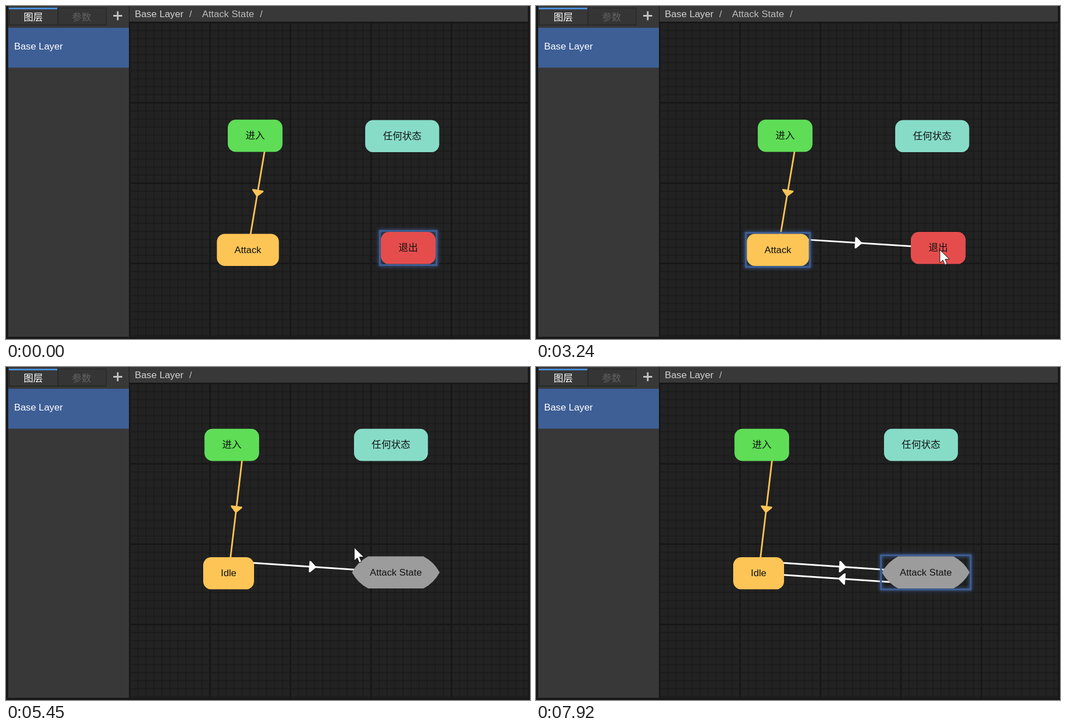
An HTML page with a canvas for the animation above (9050 ms loop, 938x597 px).

```html
<!DOCTYPE html>
<html lang="zh">
<head>
<meta charset="utf-8">
<style>
html, body { margin: 0; width: 100%; height: 100%; overflow: hidden; background: #191919; }
canvas { display: block; }
</style>
</head>
<body>
<canvas id="stage" width="938" height="597"></canvas>
<script>
const ctx = document.getElementById('stage').getContext('2d');
const LOOP = 9050, TICK = 70, UNIT = 14.4;
const FONT = '17.28px "Liberation Sans", Arial, "Noto Sans CJK SC", "Noto Sans CJK", sans-serif';
const GREEN = '#5fdd57', TEAL = '#87dcc8', ORANGE = '#fdc556', RED = '#e54d4d', GREY = '#9c9c9c';

const node = (text, x, y, w, color, lens) => ({ text, x, y, w, h: 57.6, color, lens });
const inner = {
  enter: node('进入', 397, 203.8, 98, GREEN),
  any: node('任何状态', 643, 204.5, 132.5, TEAL),
  attack: node('Attack', 377.5, 408.4, 111, ORANGE),
  exit: node('退出', 671, 405, 98, RED)
};
const outer = {
  enter: node('进入', 355.3, 110.8, 97.8, GREEN),
  any: node('任何状态', 623, 110.8, 132.3, TEAL),
  idle: node('Idle', 353, 341, 91, ORANGE),
  state: node('Attack State', 619.3, 339.4, 157, GREY, true)
};

// Pointer keys: time, x, y, easing towards the next key
const smooth = p => p * p * (3 - 2 * p);
const out = p => 1 - (1 - p) ** 2.4;
const path = [
  [600, 894, 430, out], [1160, 458.5, 433.5], [1960, 458.5, 433.5, smooth],
  [2230, 494, 450], [2370, 494, 450, smooth], [2720, 728, 439.5], [3239, 728, 439.5],
  [3240, 723, 437, smooth], [4090, 422, 19, smooth], [4500, 275, 17], [4900, 275, 17, smooth],
  [5520, 668, 363], [6190, 668, 363, smooth], [6330, 709, 388], [6600, 709, 388, smooth],
  [7090, 431.5, 361.5], [7580, 431.5, 361.5, smooth], [7850, 892, 530], [7920, 892, 530]
];
const clicks = [[1420, 1690], [1890, 2030], [2230, 2440], [2920, 3240], [4700, 4900],
  [5720, 5920], [6120, 6260], [6530, 6670], [7370, 7580]];
const within = (t, a, b) => t >= a && t < b;

function pointer(t) {
  if (!within(t, 600, 7920)) return null;
  const i = path.findIndex((k, n) => t < path[n + 1][0]);
  const [t0, x0, y0, ease = p => p] = path[i], [t1, x1, y1] = path[i + 1];
  const p = ease(Math.floor((t - t0) / TICK) * TICK / (t1 - t0));
  return { x: x0 + (x1 - x0) * p, y: y0 + (y1 - y0) * p };
}

function box(x, y, w, h, color) {
  ctx.fillStyle = color;
  ctx.fillRect(x, y, w, h);
}

function label(text, x, y, color, align = 'left') {
  ctx.font = FONT;
  ctx.textAlign = align;
  ctx.fillStyle = color;
  ctx.fillText(text, x, y);
}

function shape(points, color) {
  ctx.beginPath();
  points.forEach(([x, y]) => ctx.lineTo(x, y));
  ctx.closePath();
  ctx.fillStyle = color;
  ctx.fill();
}

function drawGrid() {
  box(221, 29, 713, 564, '#222222');
  ctx.save();
  ctx.beginPath();
  ctx.rect(221, 29, 713, 564);
  ctx.clip();
  for (let i = 0; i < 50; i++) {
    const major = i % 10 === 0, w = major ? 3 : 1.4, color = major ? '#171717' : '#1b1b1b';
    box(221.3 + i * UNIT - w / 2, 29, w, 564, color);
    box(221, 29.6 + i * UNIT - w / 2, 713, w, color);
  }
  ctx.restore();
}

function drawPanel() {
  box(4, 0, 216, 593, '#383838');
  box(221, 0, 713, 28, '#383838');
  box(5, 3, 175, 32, '#242424');
  box(6.5, 4, 85.5, 29.5, '#383838');
  box(93.5, 4, 85.5, 29.5, '#353535');
  box(5, 3, 87, 3, '#4b8fd8');
  label('图层', 31.5, 26, '#ffffff');
  label('参数', 118, 26, '#626262');
  box(192, 16, 16, 3, '#c4c4c4');
  box(198.5, 9.5, 3, 16, '#c4c4c4');
  box(4, 39, 216, 71.5, '#3e5f96');
  label('Base Layer', 14.4, 78, '#ffffff');
}

function drawCrumbs(t, deep) {
  label('Base Layer', 230.5, 19.5, within(t, 4290, 5000) ? '#ffffff' : '#d2d2d2');
  label('/', 328, 19.5, '#bcbcbc');
  if (!deep) return;
  label('Attack State', 351, 19.5, within(t, 4090, 4220) ? '#ffffff' : '#bcbcbc');
  label('/', 454.5, 19.5, '#bcbcbc');
}

function center(n) {
  return { x: n.x + n.w / 2, y: n.y + n.h / 2 };
}

// Links start beside the first centre and end at the second
function drawLink(from, to, color) {
  const c = center(from);
  const end = to.w ? center(to) : to;
  const vertical = Math.abs(end.y - c.y) > Math.abs(end.x - c.x);
  const start = vertical ? { x: c.x + 21.6, y: c.y }
    : { x: c.x, y: c.y + (end.x > c.x ? -21.6 : 21.6) };
  ctx.strokeStyle = color;
  ctx.lineWidth = 2.9;
  ctx.beginPath();
  ctx.moveTo(start.x, start.y);
  ctx.lineTo(end.x, end.y);
  ctx.stroke();
  ctx.save();
  ctx.translate((start.x + end.x) / 2, (start.y + end.y) / 2);
  ctx.rotate(Math.atan2(end.y - start.y, end.x - start.x));
  shape([[-5.5, -10], [-3, -10], [6.5, -1], [6.5, 1], [-3, 10], [-5.5, 10]], color);
  ctx.restore();
}

function drawNode(n, selected) {
  const { x, y, w, h } = n, c = center(n);
  if (selected) {
    ctx.save();
    ctx.strokeStyle = '#3e5f96';
    ctx.lineWidth = 3;
    ctx.shadowColor = '#4a76c0';
    ctx.shadowBlur = 6;
    ctx.strokeRect(x - 1.8, y - 1.8, w + 3.6, h + 3.6);
    ctx.restore();
  }
  ctx.fillStyle = n.color;
  ctx.beginPath();
  if (n.lens) {
    ctx.moveTo(x + 29, y);
    ctx.lineTo(x + w - 29, y);
    ctx.quadraticCurveTo(x + w - 10, y + 10, x + w, c.y);
    ctx.quadraticCurveTo(x + w - 10, y + h - 10, x + w - 29, y + h);
    ctx.lineTo(x + 29, y + h);
    ctx.quadraticCurveTo(x + 10, y + h - 10, x, c.y);
    ctx.quadraticCurveTo(x + 10, y + 10, x + 29, y);
  } else {
    ctx.roundRect(x, y, w, h, UNIT);
  }
  ctx.fill();
  label(n.text, c.x, c.y + 5.4, '#111111', 'center');
}

function drawMenu(x, y, hover, canDefault) {
  ctx.save();
  ctx.shadowColor = 'rgba(0,0,0,.5)';
  ctx.shadowBlur = 4;
  box(x, y, 168, 149.5, '#cccccc');
  ctx.restore();
  box(x + 1, y + 1, 166, 147.5, '#ffffff');
  if (hover) box(x + 1, y + 5.5, 166, 34.5, '#e6e6e6');
  ['连线', '设置为默认', '打开', '删除'].forEach((text, i) => {
    label(text, x + 35.5, y + 30.5 + i * 34.5, i === 1 && !canDefault ? '#6d6d6d' : '#1a1a1a');
  });
}

function drawPointer(p, pressed) {
  if (pressed) {
    ctx.fillStyle = 'rgba(255,250,0,.53)';
    ctx.beginPath();
    ctx.arc(p.x, p.y, 17.5, 0, 7);
    ctx.fill();
  }
  ctx.save();
  ctx.translate(p.x, p.y);
  shape([[0, 0], [0, 23.5], [5.3, 18.5], [9, 27], [13, 25.3], [9.3, 17], [17, 17]], '#ffffff');
  ctx.strokeStyle = '#111111';
  ctx.lineWidth = 1;
  ctx.stroke();
  ctx.restore();
}

function draw(t) {
  const deep = t < 4830, p = pointer(t);
  box(0, 0, 938, 597, '#191919');
  drawGrid();
  drawPanel();
  drawCrumbs(t, deep);
  if (deep) {
    const { enter, any, attack, exit } = inner;
    drawLink(enter, attack, ORANGE);
    if (t >= 2370) drawLink(attack, t < 3040 ? p : exit, '#ffffff');
    drawNode(enter);
    drawNode(any);
    drawNode(attack, t >= 1490);
    drawNode(exit, t < 1490);
    if (within(t, 1960, 2370)) drawMenu(458, 433, t >= 2030, false);
  } else {
    const { enter, any, idle, state } = outer;
    drawLink(enter, idle, ORANGE);
    drawLink(idle, state, '#ffffff');
    if (t >= 6600) drawLink(state, t < 7440 ? p : idle, '#ffffff');
    drawNode(enter);
    drawNode(any);
    drawNode(idle);
    drawNode(state, t >= 5790);
    if (within(t, 6190, 6600)) drawMenu(668, 363, t >= 6260, true);
  }
  if (p) drawPointer(p, clicks.some(([a, b]) => within(t, a, b)));
}

const begin = performance.now();
function tick() {
  draw((performance.now() - begin) % LOOP);
  requestAnimationFrame(tick);
}
tick();
</script>
</body>
</html>
```
